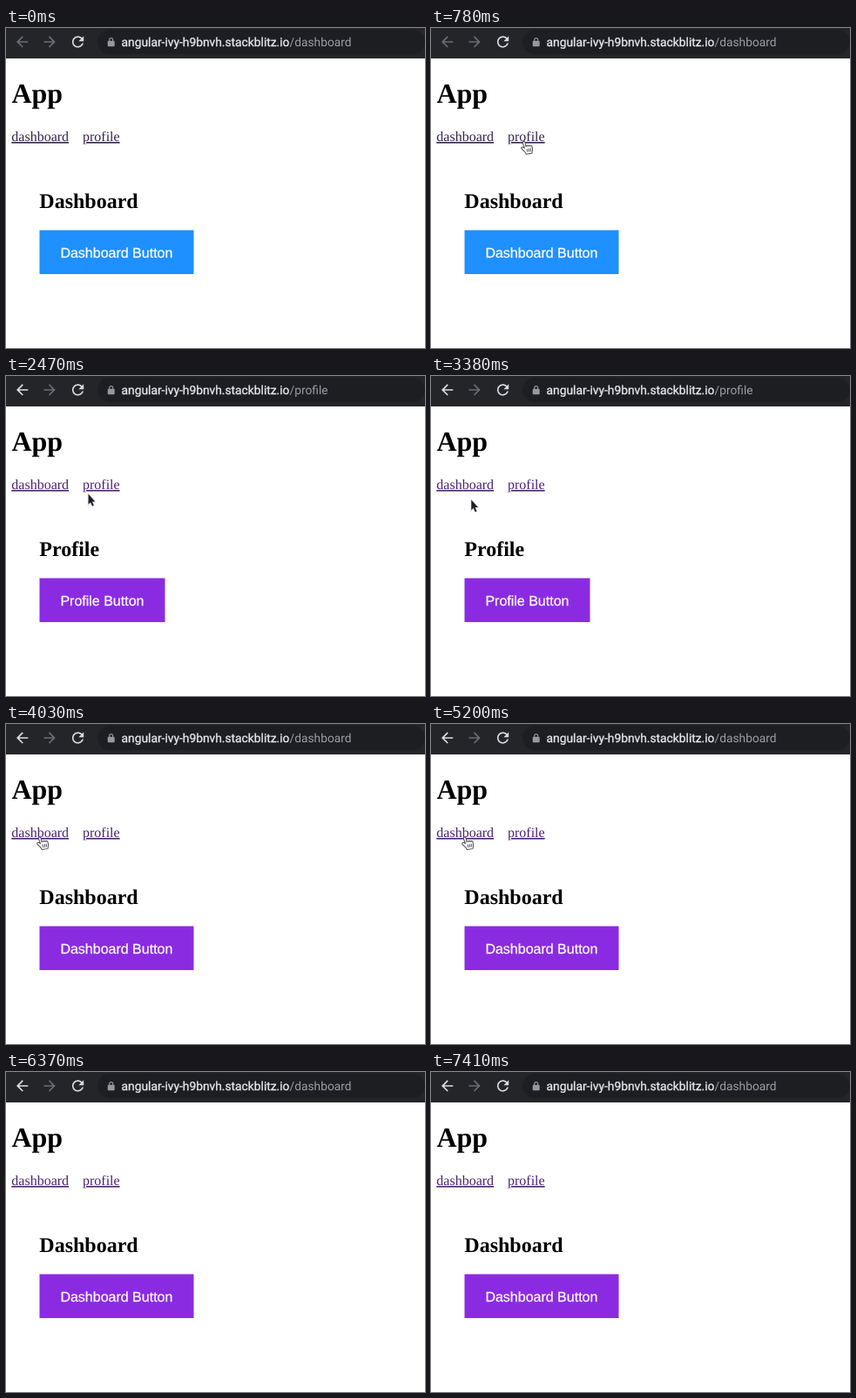
Recreate the animation shown at these times as an HTML page. Size 481 by 368 pixels, loop 7540 ms.

```html
<!DOCTYPE html>
<html lang="en">
<head>
<meta charset="utf-8">
<title>Router demo</title>
<style>
  html, body { margin: 0; width: 100%; height: 100%; overflow: hidden; background: #fff; }
  svg { display: block; width: 481px; height: 368px; }
  text { text-rendering: geometricPrecision; font-variant-ligatures: common-ligatures; }
  .serif { font-family: "Liberation Serif", Times, serif; }
  .bold { font-weight: bold; }
  .link { font-size: 16px; text-decoration: underline; }
  .url { font: 13.8px Roboto, sans-serif; }
  .host { fill: #eceaf0; stroke: #eceaf0; stroke-width: .3px; }
  .label { font: 16px "Liberation Sans", Arial, sans-serif; fill: #fff; stroke: #fff; stroke-width: .25px; }
</style>
</head>
<body>
<svg viewBox="0 0 481 368">
  <defs>
    <path id="arrow" d="M20 11H7.83l5.59-5.59L12 4l-8 8 8 8 1.41-1.41L7.83 13H20z"/>
  </defs>
  <rect width="481" height="368" fill="#fff"/>

  <rect width="481" height="35" fill="#242529"/>
  <rect x="105" y="2" width="376" height="28" rx="14" fill="#1d1e22"/>
  <use id="back" href="#arrow" transform="translate(8.7 6) scale(.83)"/>
  <use href="#arrow" fill="#6d6b74" transform="translate(60 6) scale(-.83 .83)"/>
  <path fill="#dcdbe1" transform="translate(72.6 6) scale(.83)"
    d="M17.65 6.35C16.2 4.9 14.21 4 12 4c-4.42 0-7.99 3.58-7.99 8s3.57 8 7.99 8c3.73 0 6.84-2.55 7.73-6h-2.08c-.82 2.33-3.04 4-5.65 4-3.31 0-6-2.69-6-6s2.69-6 6-6c1.66 0 3.14.69 4.22 1.78L13 11h7V4z"/>
  <g transform="translate(116.7 11)">
    <rect y="3.8" width="8" height="6.4" rx=".9" fill="#97969e"/>
    <path d="M2 4V2.6a2 2 0 0 1 4 0V4" fill="none" stroke="#97969e" stroke-width="1.1"/>
  </g>
  <text class="url" x="132.6" y="21"><tspan class="host">angular-ivy-h9bnvh.stackblitz.io</tspan><tspan id="path" fill="#9e9ca5"></tspan></text>

  <g class="serif">
    <text class="bold" x="6.4" y="86" font-size="32">App</text>
    <g id="links">
      <text class="link" x="6.3" y="130">dashboard</text>
      <text class="link" x="88" y="130">profile</text>
    </g>
    <text id="title" class="bold" x="38.3" y="207" font-size="24"></text>
  </g>
  <rect id="button" x="38.5" y="232.5" height="50.5"/>
  <text id="label" class="label" x="62.4" y="263.6"></text>

  <g id="cursor">
    <path id="pointer" d="M.3.4v11.8l2.5-2.4 1.9 4.4 1.8-.8-1.9-4.3h3.4z"
      fill="#1c1c22" stroke="#e2e1f0" stroke-width="1.6" paint-order="stroke"/>
    <g id="hand" transform="translate(-3.4 .9) rotate(-10) scale(1.1) translate(-2.6 -.8)"
      stroke="#4a4a56" stroke-width=".9" stroke-linejoin="round" stroke-linecap="round">
      <path fill="#fff" d="M5.2.8c-.9 0-1.3.7-1.2 1.6l.9 5.3c-.7-.9-1.4-1.6-2.4-1.5-1 .1-1.2 1-.7 1.7l2.6 3.7c.5.9.9 1.6 1.1 2.7h6.2c.1-1 .9-2.3 1.1-3.5.2-1.1.2-2.6 0-3.7-.2-1.1-1.6-1.3-1.9-.4-.2-1.1-1.9-1.4-2.2-.3-.3-1-1.8-1.1-2.1-.1L6.5 2C6.3 1.2 5.8.8 5.2.8z"/>
      <path fill="none" stroke-width=".8" d="M7 9.2l.3 2.8M9 9.2v2.8M10.9 9.2l-.2 2.8"/>
    </g>
  </g>
</svg>
<script>
const LOOP = 7540, TICK = 130;
const $ = id => document.getElementById(id);

// Page states: start, view name, address, button colour, back arrow enabled
const BLUE = "#1e90ff", VIOLET = "#8a2be2";
const pages = [
  [0, "Dashboard", "/dashboard", BLUE, false],
  [1560, "Profile", "/dashboard", VIOLET, false],
  [1690, "Profile", "/profile", VIOLET, true],
  [3900, "Dashboard", "/profile", VIOLET, true],
  [4030, "Dashboard", "/dashboard", VIOLET, true]
];
const widths = { Dashboard: 177, Profile: 144 };

// Cursor strokes: start, end, from, to; each rests at its end until the next
const strokes = [
  [0, 780, [262, 258], [107, 130.2]],
  [2210, 2990, [107, 130.2], [58, 150]],
  [2990, 3380, [58, 150], [46, 142]],
  [3380, 3770, [46, 142], [39, 129.6]],
  [5330, 5980, [39, 129.6], [172, 282]]
];
const SHOW = 130, HIDE = 5980;

const ease = p => p * p * (3 - 2 * p);
const latest = (rows, t) => rows.filter(r => r[0] <= t).pop();

function cursorAt(t) {
  const [start, end, a, b] = latest(strokes, t);
  const p = ease(Math.min(1, (t - start) / (end - start)));
  return a.map((v, i) => v + (b[i] - v) * p);
}

function overLink(x, y) {
  return y > 115 && y < 134 && ((x > 6 && x < 73) || (x > 88 && x < 131));
}

function draw(now) {
  const t = Math.floor((now % LOOP) / TICK) * TICK;
  const [, view, path, colour, canGoBack] = latest(pages, t);
  $("title").textContent = view;
  $("label").textContent = view + " Button";
  $("path").textContent = path;
  $("button").setAttribute("width", widths[view]);
  $("button").setAttribute("fill", colour);
  $("back").setAttribute("fill", canGoBack ? "#dcdbe1" : "#6d6b74");
  $("links").setAttribute("fill", colour === BLUE ? "#36244f" : "#4a2270");

  const [x, y] = cursorAt(t);
  const hand = overLink(x, y);
  $("cursor").setAttribute("transform", `translate(${x} ${y})`);
  $("cursor").style.display = t >= SHOW && t < HIDE ? "" : "none";
  $("hand").style.display = hand ? "" : "none";
  $("pointer").style.display = hand ? "none" : "";
}

const origin = performance.now();
function loop() {
  draw(performance.now() - origin);
  requestAnimationFrame(loop);
}
loop();
</script>
</body>
</html>
```
